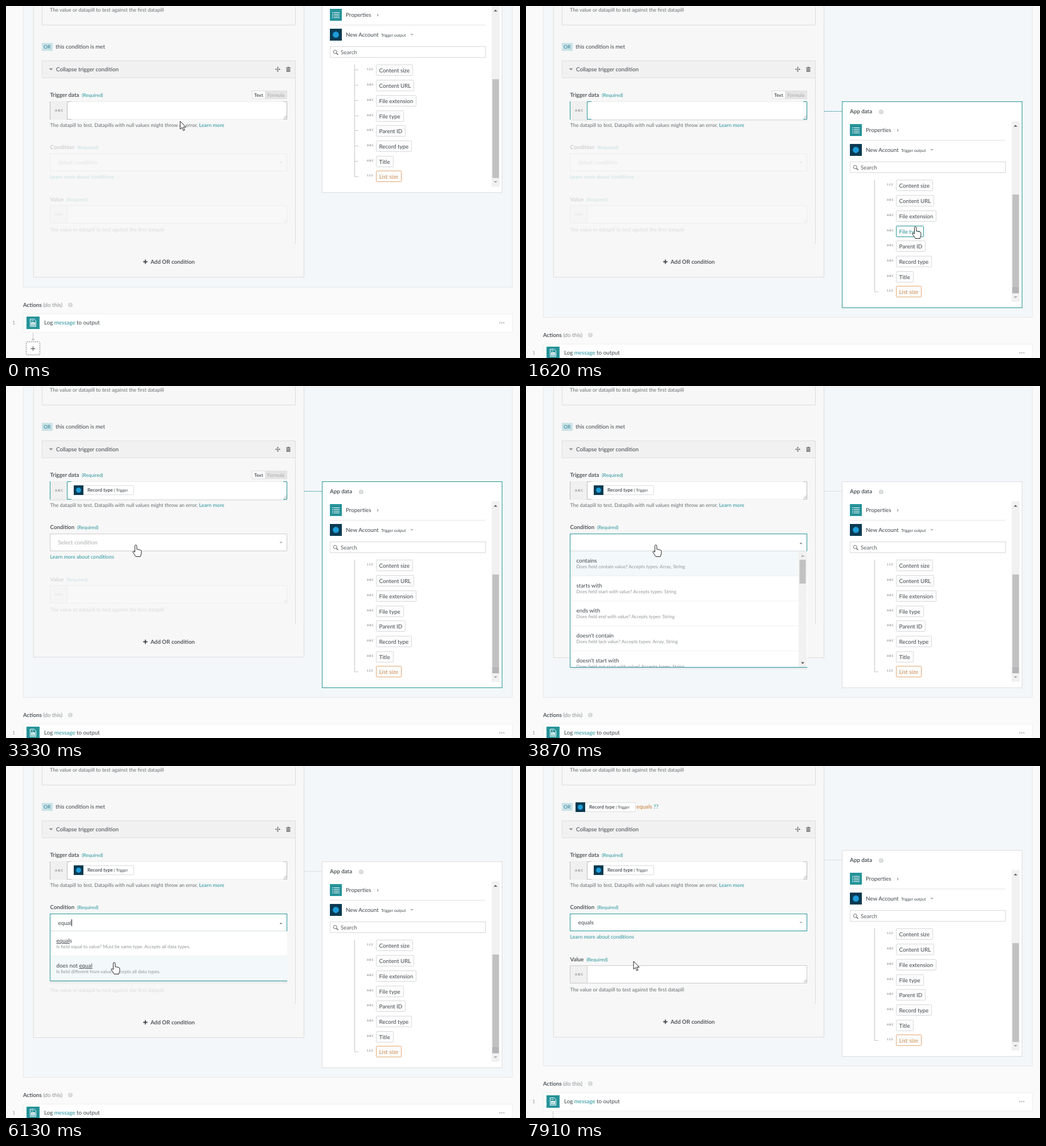
Write an HTML page that moves like this. It is 903 px wide and 620 px high and loops after 8 s.

```html
<!DOCTYPE html>
<html lang="en">
<head>
<meta charset="utf-8">
<title>Trigger condition</title>
<style>
  html, body { margin: 0; width: 100%; height: 100%; overflow: hidden; background: #fafafa; }
  svg { display: block; }
  text { font-family: Lato, sans-serif; white-space: pre; text-rendering: geometricPrecision; }
</style>
</head>
<body>
<script>
const LOOP = 8000;
const TEAL = '#26939a', INK = '#3f474b', HINT = '#666d70', MUTED = '#9aa0a3', LINE = '#dcdddd', NAVY = '#093a52';
const HINT_SIZE = 8.95, ABOUT_SIZE = 8.25;

const OPEN_AT = 3400, CHOOSE_AT = 7420, FOCUS_AT = 290, PILL_AT = 2320;
const TYPING = [[0, ''], [5140, 'e'], [5580, 'eq'], [5820, 'equ'], [5900, 'equa'], [6130, 'equal']];
const CARET_ON = [[3400, 3580], [4110, 4640], [5140, 6690], [7220, 7420]];
const CURSOR = [
  [0, 306, 203], [70, 305, 200], [130, 307, 190], [290, 307, 190], [450, 325, 188], [600, 325, 188],
  [1070, 686, 391], [1150, 684, 389], [1620, 684, 389], [1920, 658, 450], [2090, 658, 447], [2640, 658, 447],
  [3180, 228, 280], [4400, 228, 280], [4650, 190, 346], [6950, 190, 346], [7090, 191, 343], [7150, 191, 343],
  [7290, 191, 312], [7420, 191, 312], [7700, 189, 344]
];
const CONDITIONS = [
  ['contains', 'Does field contain value? Accepts types: Array, String'],
  ['starts with', 'Does field start with value? Accepts types: String'],
  ['ends with', 'Does field end with value? Accepts types: String'],
  ["doesn't contain", 'Does field lack value? Accepts types: Array, String'],
  ["doesn't start with", 'Does field not start with value? Accepts types: String'],
  ["doesn't end with", 'Does field not end with value? Accepts types: String'],
  ['equals', 'Is field equal to value? Must be same type. Accepts all data types.'],
  ['does not equal', 'Is field different from value? Accepts all data types.']
];
const PILLS = ['Content size', 'Content URL', 'File extension', 'File type', 'Parent ID', 'Record type', 'Title', 'List size'];

// Drawing helpers
function el(parent, tag, attrs = {}, content = '') {
  const node = document.createElementNS('http://www.w3.org/2000/svg', tag);
  set(node, attrs);
  node.textContent = content;
  parent.append(node);
  return node;
}
function set(node, attrs) {
  for (const name in attrs) node.setAttribute(name, attrs[name]);
}
const group = parent => el(parent, 'g');
const box = (parent, x, y, width, height, fill = 'none', stroke = 'none', rx = 0) =>
  el(parent, 'rect', { x, y, width, height, fill, stroke, rx });
const path = (parent, d, stroke = LINE, fill = 'none') => el(parent, 'path', { d, stroke, fill });
const solid = (parent, d, fill) => path(parent, d, 'none', fill);

// y is the optical middle of the line; the baseline sits on a whole pixel
function label(parent, x, y, parts, size = 9.8, fill = INK, weight = 400) {
  const node = el(parent, 'text', { x, y: Math.round(y + size * .35), 'font-size': size, fill, 'font-weight': weight });
  for (const part of [].concat(parts)) {
    if (part.attrs) el(node, 'tspan', part.attrs, part.text);
    else node.append(part);
  }
  return node;
}
const span = (text, attrs) => ({ text, attrs });
const show = (node, on) => node.setAttribute('visibility', on ? 'visible' : 'hidden');
const move = (node, x, y) => node.setAttribute('transform', `translate(${x} ${y})`);
const teal = text => span(text, { fill: TEAL });
const required = name => [name + ' ', span('(Required)', { fill: TEAL, 'font-size': 8.4, 'font-weight': 400 })];
const triangle = (parent, x, y, dir, fill = MUTED, r = 3) =>
  solid(parent, dir === 'right' ? `M${x - r / 2} ${y - r}l${r} ${r}l${-r} ${r}z`
    : `M${x - r} ${y - dir * r / 2}h${2 * r}l${-r} ${dir * r}z`, fill);

function tag(parent, x, y, text, size = 5.6, spacing = 1.3) {
  set(label(parent, x, y, text, size, '#85898b', 700), { 'letter-spacing': spacing });
}
function help(parent, x, y) {
  el(parent, 'circle', { cx: x, cy: y, r: 4, fill: '#d5d8d9' });
  set(label(parent, x, y, '?', 6, '#fff', 700), { 'text-anchor': 'middle' });
}
function appIcon(parent, x, y, size) {
  box(parent, x, y, size, size, NAVY);
  el(parent, 'circle', { cx: x + size / 2, cy: y + size / 2, r: size * .26, fill: '#1d9dd9' });
}
function recordPill(parent, x, y) {
  const g = group(parent);
  box(g, x + .5, y + .5, 105, 16, '#fff', LINE, 1);
  appIcon(g, x, y, 17);
  label(g, x + 24, y + 8.5, ['Record type ', span('| Trigger', { 'font-size': 7, 'font-weight': 400 })], 8.4, INK, 600);
  return g;
}
function inputField(parent, y) {
  box(parent, 77.5, y + .5, 416, 31, '#fff', '#ededed');
  box(parent, 78, y + 1, 29, 30, '#f0f0f0');
  tag(parent, 86, y + 16, 'ABC');
  path(parent, `M488 ${y + 30}l5-5M491 ${y + 30}l2-2`, '#999');
}

const svg = el(document.body, 'svg', { width: 903, height: 620, viewBox: '0 0 903 620' });
box(svg, 0, 0, 903, 620, '#fafafa');
const section = box(svg, 30.5, -9.5, 859, 505, '#f3f7fa', '#e6eaec');

// Trigger card
const card = box(svg, 48.5, -9.5, 475, 487, '#f7f7f7', LINE);
label(svg, 77, 6.5, 'The value or datapill to test against the first datapill', HINT_SIZE, HINT);
path(svg, 'M63.5 0V33.5H508.5V0');
box(svg, 63, 65, 19, 14, '#c9e3e9');
label(svg, 66, 72, 'OR', 8.8, '#337f91');
const unmet = label(svg, 87, 71.5, 'this condition is met');
const summary = group(svg);
recordPill(summary, 87, 64);
label(summary, 194, 72, ['equals ', teal('??')], 9.8, '#c77a35');
box(svg, 63.5, 96.5, 445, 30, '#f1f1f1', '#dfdfdf');
path(svg, 'M508.5 127V419');
triangle(svg, 79, 111.5, 1, '#8c8c8c', 3.5);
label(svg, 88, 111.5, 'Collapse trigger condition');
path(svg, 'M473.5 111.5h8M477.5 107.5v8M476 109l1.5-1.5 1.5 1.5M476 114l1.5 1.5 1.5-1.5M475 110l-1.5 1.5 1.5 1.5M480 110l1.5 1.5-1.5 1.5', '#777');
solid(svg, 'M492 108.3h2.5v-1.3h3v1.3h2.5v1.4h-8zM492.7 110.4h6.6v5.6h-6.6z', '#777');
path(svg, 'M494.5 111.5v3.5M496 111.5v3.5M497.5 111.5v3.5', '#ccc').setAttribute('stroke-width', .6);

label(svg, 77.5, 156.5, required('Trigger data '), 9.8, INK, 600);
const toggle = group(svg);
box(toggle, 432, 149, 62, 15, '#e4e4e4');
box(toggle, 432.5, 149.5, 23, 14, '#fff', LINE);
label(toggle, 436, 157, 'Text', 8.4, INK, 600);
label(toggle, 459, 157, 'Formula', 8.4, '#a5a8aa');
const glow = box(svg, 78, 199, 416, 3, '#e7e9e9');
inputField(svg, 168);
const brackets = path(svg, 'M77.5 168V200M115 168.5H107.5V199.5H115M487 168.5H493.5V199.5H487');
const pill = recordPill(svg, 119, 175);
label(svg, 77.5, 209.5, ['The datapill to test. Datapills with null values might throw an error. ', teal('Learn more')], HINT_SIZE, HINT);

const condition = group(svg);
label(condition, 77.5, 249, required('Condition '), 9.8, INK, 600);
const combo = box(condition, 77.5, 260.5, 416, 30, '#fff', '#ccc');
const comboText = label(condition, 91.5, 275.5, 'Select condition');
const arrowDown = triangle(condition, 483, 275.7, 1, MUTED, 2.5);
const arrowUp = triangle(condition, 483, 277, -1, '#777', 2.5);
label(condition, 77.5, 301, 'Learn more about conditions', HINT_SIZE, TEAL);
const caret = box(svg, 92, 270, 1, 12, '#222');

const value = group(svg);
label(value, 77.5, 340.5, required('Value '), 9.8, INK, 600);
inputField(value, 351);
path(value, 'M77.5 351.5H493.5V382.5H77.5zM107.5 351V383', '#ccc');
label(value, 77.5, 393.5, 'The value or datapill to test against the first datapill', HINT_SIZE, HINT);

const addOr = group(svg);
path(addOr, 'M241 450.5h7.5M244.8 446.8v7.5', INK).setAttribute('stroke-width', 1.8);
label(addOr, 254, 450.5, 'Add OR condition', 9.8, INK, 600);

// Actions
const actions = group(svg);
label(actions, 30, 527, ['Actions ', span('(do this)', { fill: '#8b9093', 'font-weight': 400 })], 9.8, INK, 600);
help(actions, 113, 526.5);
label(actions, 11, 558, '1', 9.1, MUTED);
box(actions, 30.5, 542.5, 859, 32, '#fff', '#f0f0f0');
box(actions, 36, 547, 23, 22, TEAL);
path(actions, 'M42.5 551.5h7l3 3v10h-10zM44.5 554.5h4', '#fff');
box(actions, 44, 557, 7, 6, '#fff');
path(actions, 'M45 559.5h5M45 561.5h5', TEAL).setAttribute('stroke-width', .7);
label(actions, 67, 558, ['Log ', teal('message'), ' to output']);
for (const x of [867.5, 871, 874.5]) el(actions, 'circle', { cx: x, cy: 558, r: 1.2, fill: '#b5b8ba' });
path(actions, 'M47.5 575V588', '#ccc');
triangle(actions, 47.5, 588, 1, '#bbb', 3);
set(box(actions, 35.5, 591.5, 24, 23, '#fff', '#777', 1), { 'stroke-dasharray': '2 1.5' });
path(actions, 'M43.5 603.5h8M47.5 599.5v8', INK);

// App data panel
const panel = group(svg);
const link = path(panel, 'M524 185.5H555');
link.setAttribute('stroke-dasharray', '2 1');
const frame = box(panel, 555.5, 168.5, 316, 363, '#fff', LINE);
label(panel, 569, 186, 'App data', 9.8, INK, 600);
help(panel, 624, 186.5);
box(panel, 569, 208, 21, 21, TEAL);
for (let y = 214.5; y < 225; y += 3) path(panel, `M573 ${y}h2M576 ${y}h10`, '#fff');
label(panel, 597, 219, 'Properties');
triangle(panel, 653.5, 219, 'right', '#b5b5b5');
path(panel, 'M569 236.5H842', '#e4e4e4');
appIcon(panel, 569, 243, 21);
label(panel, 597, 253.5, 'New Account');
label(panel, 659, 254.5, 'Trigger output', 7);
triangle(panel, 713, 253.5, 1, '#b5b5b5');
box(panel, 569.5, 274.5, 273, 19, '#fff', '#d9d9d9');
el(panel, 'circle', { cx: 578.3, cy: 283.7, r: 3, fill: 'none', stroke: '#666' });
path(panel, 'M580.5 286l3 3', '#666').setAttribute('stroke-width', 1.4);
label(panel, 588, 284.2, 'Search', 9.8, '#5a6164');
path(panel, 'M612.5 306V503.5H619', '#c5c5c5');
const ticks = group(panel);
const pills = PILLS.map((name, i) => {
  const y = Math.round(316.4 + i * 26.7), counted = i === 0 || i === 7;
  if (i < 7) path(ticks, `M612 ${y - .5}h7`, '#c5c5c5');
  tag(panel, 634, y - 1.5, counted ? '123' : 'ABC', 4.9, .9);
  const rest = i === 7 ? '#e2a873' : '#d9d9d9', ink = i === 7 ? '#c98a50' : INK;
  const rect = box(panel, 650.5, y - 9.5, 50, 19, '#fcfcfc', rest, 1);
  const text = label(panel, 655.5, y + .3, name, 9.8, ink);
  return { y, rect, text, rest, ink, width: 0 };
});
box(panel, 853, 203, 14, 318, '#f1f1f1');
box(panel, 854.5, 332, 11.5, 174, '#c1c1c1');
const thumbEnd = box(panel, 854.5, 495, 11.5, 11, '#b4b4b9');
triangle(panel, 860, 211, -1, '#505050', 3.2);
triangle(panel, 860, 513, 1, '#a3a3a3', 3.2);

// Dropdown
const menu = group(svg);
const menuShadow = box(menu, 78, 291, 416, 208, '#000');
menuShadow.setAttribute('opacity', .05);
const menuFill = box(menu, 78, 291, 416, 205, '#fff');
const rows = el(menu, 'svg', { x: 78, y: 291, width: 416, height: 204 });
const menuEdge = path(menu, '', TEAL);
path(menu, 'M78 290.5H493', '#d5dcde');
const scroll = group(menu);
box(scroll, 479, 291, 14, 204, '#f1f1f1');
const menuThumb = box(scroll, 480.5, 306, 11, 68, '#c1c1c1');
triangle(scroll, 486, 299, -1, '#a3a3a3');
triangle(scroll, 486, 488, 1, '#505050');

let shownQuery = null, rowRects = [];
function fillMenu(query) {
  if (query === shownQuery) return;
  shownQuery = query;
  rows.replaceChildren();
  const found = CONDITIONS.filter(([name]) => name.includes(query));
  rowRects = found.map(([name, about], i) => {
    const y = i * 44, at = name.indexOf(query), end = at + query.length;
    const rect = box(rows, 0, y, 416, 43, '#fff');
    path(rows, `M0 ${y + 43.5}h416`, '#f0f0f0');
    label(rows, 10.5, y + 16.3, [name.slice(0, at), span(name.slice(at, end), { 'text-decoration': 'underline' }), name.slice(end)]);
    label(rows, 10.5, y + 27.5, about, ABOUT_SIZE, '#92979a');
    return rect;
  });
  const height = Math.min(205, found.length * 44);
  set(menuFill, { height });
  set(menuShadow, { height: height + 3 });
  set(menuEdge, { d: `M77.5 291V${290.5 + height}H494` });
  set(menuThumb, { height: query ? 68 : 42 });
  set(scroll, { display: found.length > 4 ? 'inline' : 'none' });
}

// Pointer shapes, all with the hot spot at 0,0
const pointer = group(svg);
const shapes = {
  arrow: path(pointer, 'M0 0V14l3.2-3 2.4 5.5 2.3-1-2.4-5.2H10z', '#222', '#fff'),
  beam: path(pointer, 'M-3-6.5h2L0-6l1-.5h2M0-6V6M-3 6.5h2L0 6l1 .5h2', '#111'),
  hand: path(pointer, 'M-1.6 12.5V1.7a1.7 1.7 0 0 1 3.4 0V7.5l5.8 1.2q2.2.5 2.2 2.6v4l-1.8 5.2H0l-4.8-7.4q-.8-2.2 1.2-2.2z', '#222', '#fff')
};

// Timing helpers
const clamp = p => Math.max(0, Math.min(1, p));
const ramp = (t, from, length) => clamp((t - from) / length);
const easeOut = p => 1 - (1 - p) ** 3;
const smooth = p => p * p * (3 - 2 * p);
function cursorAt(t) {
  const next = CURSOR.findIndex(key => key[0] > t);
  if (next < 0) return CURSOR[CURSOR.length - 1].slice(1);
  const [t0, x0, y0] = CURSOR[next - 1], [t1, x1, y1] = CURSOR[next];
  const p = smooth((t - t0) / (t1 - t0));
  return [x0 + (x1 - x0) * p, y0 + (y1 - y0) * p];
}

function render(t) {
  const open = t >= OPEN_AT && t < CHOOSE_AT, chosen = t >= CHOOSE_AT;
  const focused = t >= FOCUS_AT && t < OPEN_AT;
  const query = TYPING.filter(step => step[0] <= t).pop()[1];
  const [x, y] = cursorAt(t);

  // The panel slides to its field and pushes the section's end down
  const shift = Math.round(-203 * (1 - easeOut(ramp(t, FOCUS_AT, 290))) - 20 * easeOut(ramp(t, CHOOSE_AT, 290)));
  const bottom = Math.max(496, 549 + shift);
  move(panel, 0, shift);
  move(actions, 0, bottom - 496);
  set(section, { height: bottom + 9 });
  set(frame, { stroke: focused ? TEAL : LINE });
  set(link, { stroke: focused ? TEAL : '#cfd6d9' });
  show(link, t > 600);
  show(ticks, t < 600);
  show(thumbEnd, t > FOCUS_AT && !chosen);

  set(brackets, { stroke: focused ? TEAL : '#bbb' });
  show(glow, focused);
  show(toggle, t < OPEN_AT);
  show(pill, t >= PILL_AT);
  show(unmet, !chosen);
  show(summary, chosen);

  const nudge = open ? 1 : 0;
  set(card, { height: 487 + nudge });
  move(addOr, 0, nudge);
  move(value, 0, nudge);
  set(condition, { opacity: .24 + .76 * ramp(t, 2640, 360) });
  set(value, { opacity: .2 + .8 * ramp(t, CHOOSE_AT, 320) });

  set(combo, { stroke: open || chosen ? TEAL : '#ccc' });
  comboText.textContent = chosen ? 'equals' : open ? query : 'Select condition';
  set(comboText, { fill: open || chosen ? INK : '#a9adaf' });
  move(comboText, 0, nudge);
  show(arrowDown, !open);
  show(arrowUp, open);
  const caretOn = CARET_ON.some(([from, to]) => t >= from && t < to);
  show(caret, caretOn);
  if (caretOn) set(caret, { x: Math.round(91.5 + (query ? comboText.getComputedTextLength() : 0)) });

  set(menu, { display: open ? 'inline' : 'none' });
  if (open) {
    fillMenu(query);
    const hovered = Math.max(0, Math.floor((y - 291) / 44));
    rowRects.forEach((rect, i) => set(rect, { fill: i === hovered ? '#f3f8fa' : '#fff' }));
  }
  let hand = open || (y > 260 && y < 291 && x > 77 && x < 494);
  for (const p of pills) {
    const over = x > 650 && x < 651 + p.width && Math.abs(y - p.y - shift) < 10;
    hand = hand || over;
    set(p.rect, { stroke: over ? TEAL : p.rest });
    set(p.text, { fill: over ? TEAL : p.ink });
  }
  const shape = hand ? 'hand' : x > 107 && x < 494 && y > 168 && y < 199 ? 'beam' : 'arrow';
  for (const name in shapes) show(shapes[name], name === shape);
  move(pointer, Math.round(x), Math.round(y));
}

function fitPills() {
  for (const p of pills) {
    p.width = Math.round(p.text.getComputedTextLength() + 10.5);
    set(p.rect, { width: p.width });
  }
}

fitPills();
const start = performance.now();
function tick() {
  render((performance.now() - start) % LOOP);
  requestAnimationFrame(tick);
}
tick();
</script>
</body>
</html>
```
